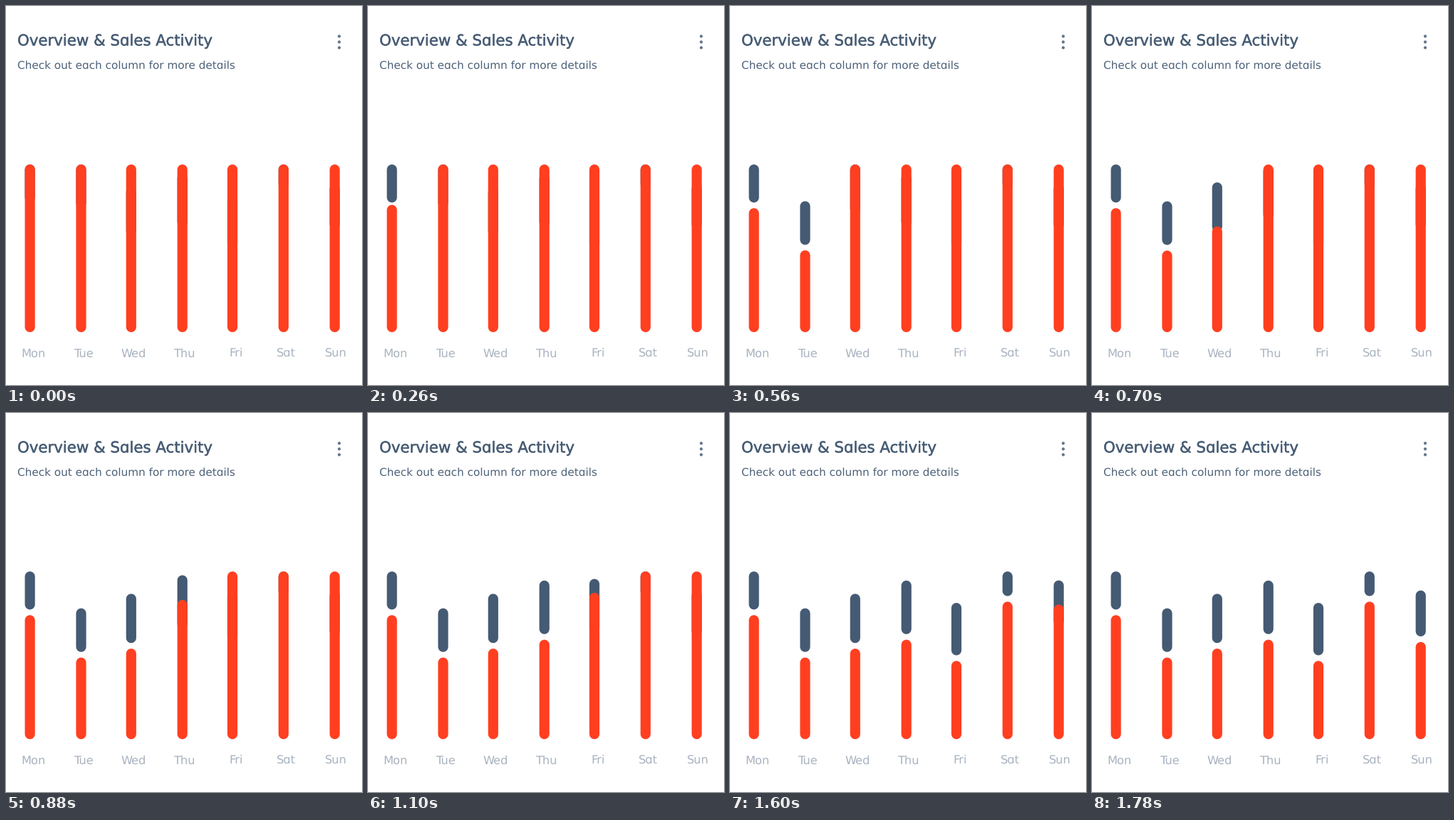
A matplotlib script that plays this animation: 500x531 px, repeating every 3.02 s.

```python
import matplotlib.pyplot as plt
from matplotlib.animation import FuncAnimation
from matplotlib.patches import Circle
from matplotlib.patheffects import withStroke

W, H, DPI = 500, 531, 64
PT = 72 / DPI
STEP, LOOP = 20, 3020

RED, SLATE = "#ff3f20", "#455a73"
TITLE, SUB, LABEL, DOT = "#485d75", "#4d6179", "#a9b3c0", "#64768b"

TOP, BOTTOM = 222, 457
BAR_W, GAP = 14.2, 7.8
FIRST, SPACING, DURATION = 128, 238, 224

# day, bar left, label centre, resting top and height of the slate segment
DAYS = [
    ("Mon", 26.5, 38.3, 222.0, 53.4),
    ("Tue", 98.4, 108.5, 273.6, 61.2),
    ("Wed", 168.7, 179.5, 253.3, 69.0),
    ("Thu", 240.6, 250.0, 234.7, 75.1),
    ("Fri", 310.9, 322.8, 266.0, 73.5),
    ("Sat", 382.7, 393.0, 222.0, 34.5),
    ("Sun", 454.6, 463.0, 248.6, 64.4),
]

plt.rcParams["font.family"] = "DejaVu Sans"
plt.rcParams["text.hinting"] = "none"

fig = plt.figure(figsize=(W / DPI, H / DPI), dpi=DPI, facecolor="white")
ax = fig.add_axes([0, 0, 1, 1])
ax.set_xlim(0, W)
ax.set_ylim(H, 0)
ax.axis("off")


def write(x, y, text, size, color, **kw):
    # the alpha glyph gives the round single-storey "a"
    return ax.text(x, y, text.replace("a", "\u0251"), fontsize=size * PT,
                   color=color, va="baseline", **kw)


def pill(x, color, z):
    mid = x + BAR_W / 2
    return ax.plot([mid, mid], [TOP, BOTTOM], color=color, lw=BAR_W * PT,
                   solid_capstyle="round", snap=False, zorder=z)[0]


def span(bar, top, bottom):
    bar.set_ydata([top + BAR_W / 2, bottom - BAR_W / 2])


def progress(i, t):
    u = (t - FIRST - i * SPACING) / DURATION
    u = min(max(u, 0), 1)
    return 1 - (1 - u) ** 2.9


title = write(16, 55.3, "Overview & Sales Activity", 21.3, TITLE)
title.set_path_effects([withStroke(linewidth=0.45 * PT, foreground=TITLE)])
write(15.8, 87.8, "Check out each column for more details", 15.2, SUB)
for y in (42.4, 50.4, 58.4):
    ax.add_patch(Circle((468, y), 2.1, color=DOT, linewidth=0))

bars = []
for day, x, mid, rest, height in DAYS:
    write(mid, 491.3, day, 16.2, LABEL, ha="center")
    bars.append((pill(x, SLATE, 2), pill(x, RED, 3)))


def draw(frame):
    t = frame * STEP
    for i, (slate, red) in enumerate(bars):
        rest, height = DAYS[i][3:]
        drop = progress(i, t)
        # a slate segment slides up behind its bar one turn before it drops
        lift = progress(i - 1, t) if i > 1 else 1
        y = TOP + (rest - TOP) * (1 - lift + drop)
        span(slate, y, y + height)
        span(red, TOP + (rest + height + GAP - TOP) * drop, BOTTOM)
    return [bar for pair in bars for bar in pair]


anim = FuncAnimation(fig, draw, frames=LOOP // STEP, interval=STEP,
                     init_func=lambda: draw(0), repeat=True, repeat_delay=0)
plt.show()
```
